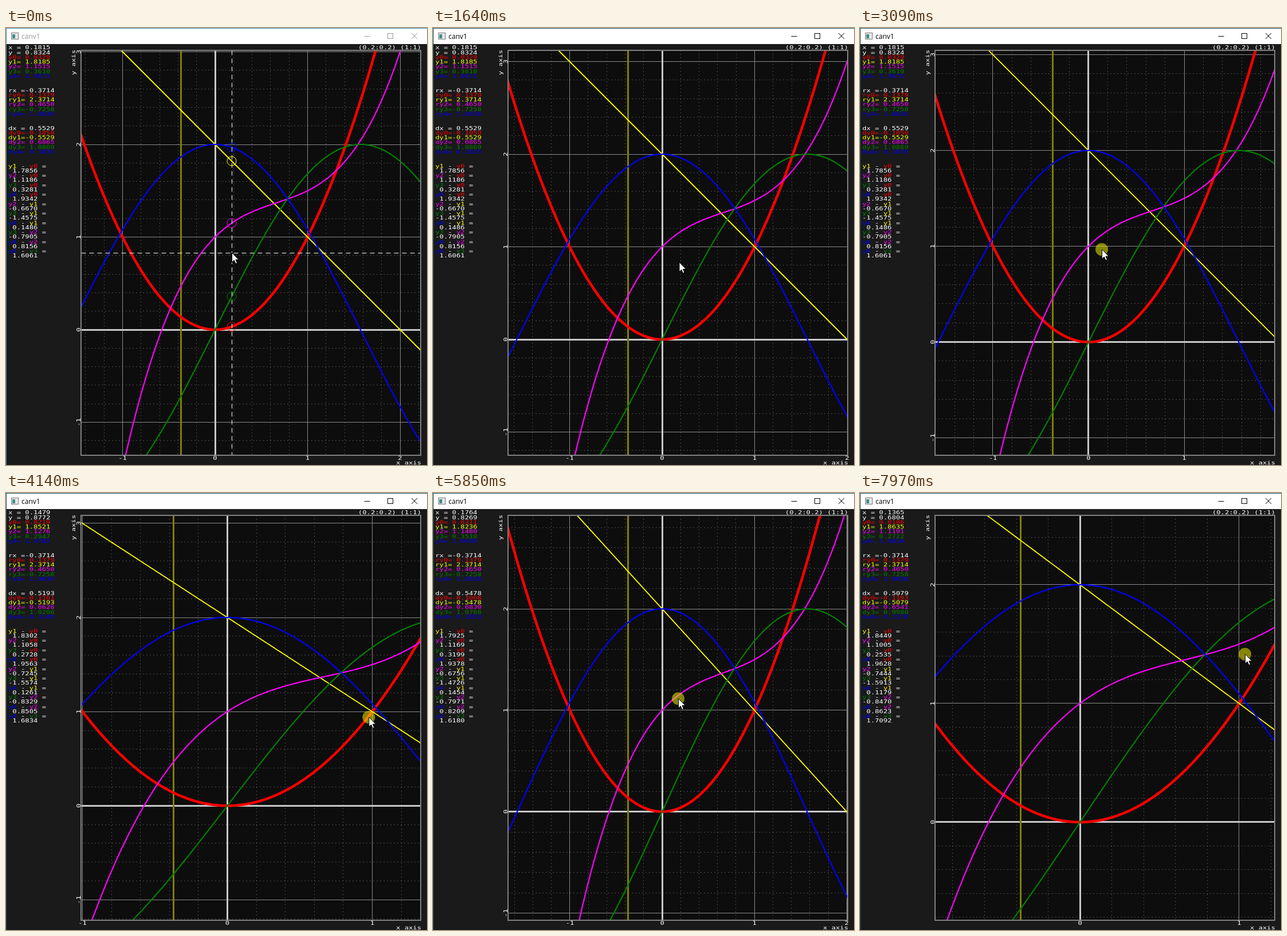
An HTML page with a canvas that plays this animation: 735 px wide and 762 px high, repeating every 8000 ms.

```html
<!DOCTYPE html>
<html lang="en">
<head>
<meta charset="utf-8">
<title>canv1</title>
<style>
  html, body { margin: 0; width: 100%; height: 100%; overflow: hidden; background: #1a1a1a; }
  canvas { display: block; }
</style>
</head>
<body>
<canvas id="stage" width="735" height="762"></canvas>
<script>
const ctx = document.getElementById('stage').getContext('2d');
const LOOP = 8000, LAG = 30;
const PLOT = { l: 131, t: 39, r: 724, b: 745 };
const WIDTH = PLOT.r - PLOT.l, HEIGHT = PLOT.b - PLOT.t;
const START = { ox: 365, oy: 526, sx: 161.5, sy: 161.5 };
const BASE = { ox: 400, oy: 543, sx: 161.5, sy: 161.5 };
const REF_X = -0.3714;
const CHAR = 7.34, ROW = 8.25;

const curves = [
  { f: x => x * x, color: '#ff0000', width: 4.5 },
  { f: x => 2 - x, color: '#ffff00', width: 1.8 },
  { f: x => 1 + x - x * x + x ** 3 / 2, color: '#ff00ff', width: 2.2 },
  { f: x => 2 * Math.sin(x), color: '#008000', width: 2.2 },
  { f: x => 2 * Math.cos(x), color: '#0000ff', width: 2.2 }
];

// start time, interaction, data point under the pointer (omitted while it moves freely)
const phases = [
  [0, 'hover', 0.1815, 0.8324],
  [360, 'pan', 0.1815, 0.8324],
  [1640, 'idle', 0.1815, 0.8324],
  [1920, 'even', 0.1815, 0.8324],
  [3330, 'hover'],
  [3560, 'free', 0.1479, 0.8772],
  [5060, 'hover'],
  [5240, 'free', 0.1764, 0.8269],
  [6210, 'hover'],
  [6310, 'hover', 0.1365, 0.6804],
  [6870, 'free', 0.1365, 0.6804]
];

// pointer path: time, x, y
const path = [
  [0, 394, 392], [360, 394, 392], [680, 455, 432], [960, 360, 445], [1290, 375, 355],
  [1610, 429.5, 408.5], [1920, 429.5, 408.5], [2280, 426, 530], [2660, 424, 290],
  [2760, 424, 290], [3060, 422, 385], [3090, 422, 386], [3250, 429, 408], [3330, 429, 408],
  [3530, 424, 401], [3580, 424, 401], [4070, 641, 391], [4110, 638.4, 390], [4140, 634, 391],
  [4610, 270, 396], [4990, 424, 401], [5060, 424, 401], [5210, 428.5, 409.5],
  [5260, 428.5, 409.5], [5340, 427, 402], [5490, 427, 402], [5690, 427, 300], [5820, 427, 348],
  [5850, 428, 358], [6030, 428, 460], [6170, 428.5, 409.5], [6210, 428.5, 409.5],
  [6310, 422, 433], [6870, 422, 433], [7120, 525.4, 416], [7150, 527, 421],
  [7660, 610, 335], [7710, 610, 335], [7940, 670, 278], [7970, 672, 281], [8000, 672, 281]
];

function slope(i, axis) {
  if (i === 0 || i === path.length - 1) return 0;
  const [p, q, r] = [path[i - 1], path[i], path[i + 1]];
  const before = q[axis] - p[axis], after = r[axis] - q[axis];
  return before * after <= 0 ? 0 : (before + after) / (r[0] - p[0]);
}

function pointer(t) {
  let i = 0;
  while (i < path.length - 2 && path[i + 1][0] <= t) i++;
  const a = path[i], b = path[i + 1], span = b[0] - a[0];
  const u = Math.max(0, (t - a[0]) / span), v = 1 - u;
  return [1, 2].map(k =>
    v * v * (1 + 2 * u) * a[k] + u * u * (3 - 2 * u) * b[k] +
    span * u * v * (v * slope(i, k) - u * slope(i + 1, k)));
}

function viewAt(t, [start, mode, dataX, dataY]) {
  if (t < 360) return START;
  const [mx, my] = pointer(Math.max(start, t - LAG));
  if (mode === 'pan') return { ...START, ox: START.ox + mx - 394.3, oy: START.oy + my - 391.6 };
  if (mode !== 'even' && mode !== 'free') return BASE;
  const ax = BASE.ox + dataX * BASE.sx, ay = BASE.oy - dataY * BASE.sy;
  const zoomY = 1 / (1 + (my - ay) / HEIGHT);
  const zoomX = mode === 'even' ? zoomY : 1 / (1 - (mx - ax) / WIDTH);
  const sx = BASE.sx * zoomX, sy = BASE.sy * zoomY;
  return { ox: ax - dataX * sx, oy: ay + dataY * sy, sx, sy };
}

function line(x1, y1, x2, y2, color, width = 1, dash = []) {
  const snap = v => width % 2 ? Math.floor(v) + 0.5 : Math.round(v);
  ctx.strokeStyle = color;
  ctx.lineWidth = width;
  ctx.setLineDash(dash);
  ctx.beginPath();
  ctx.moveTo(snap(x1), snap(y1));
  ctx.lineTo(snap(x2), snap(y2));
  ctx.stroke();
  ctx.setLineDash([]);
}
const vertical = (x, ...style) => line(x, PLOT.t, x, PLOT.b, ...style);
const horizontal = (y, ...style) => line(PLOT.l, y, PLOT.r, y, ...style);

function disc(x, y, r, color) {
  ctx.fillStyle = color;
  ctx.beginPath();
  ctx.arc(x, y, r, 0, Math.PI * 2);
  ctx.fill();
}

// wide terminal lettering, centred vertically on y
function label(text, x, y, color = '#fff', align = 'left', angle = 0) {
  ctx.save();
  ctx.translate(x, y);
  ctx.rotate(angle);
  ctx.scale(1.355, 1);
  ctx.font = '9px "DejaVu Sans Mono", monospace';
  ctx.textAlign = align;
  ctx.fillStyle = color;
  ctx.fillText(text, 0, 3.3);
  ctx.restore();
}

function drawWindow(active) {
  const ink = active ? '#000' : '#999';
  ctx.fillStyle = '#1a1a1a';
  ctx.fillRect(0, 0, 735, 762);
  ctx.fillStyle = '#fff';
  ctx.fillRect(0, 0, 735, 28);
  line(0, 0, 735, 0, active ? '#17505f' : '#2f8db0');
  line(0, 0, 0, 762, active ? '#17505f' : '#2f8db0');
  ctx.fillStyle = '#777';
  ctx.fillRect(9, 8, 13, 12);
  ctx.fillStyle = '#e8e8e8';
  ctx.fillRect(10, 9, 11, 10);
  ctx.fillStyle = '#3f8f8a';
  ctx.fillRect(11, 11, 5, 7);
  ctx.font = '12px "Open Sans", "Noto Sans", sans-serif';
  ctx.textAlign = 'left';
  ctx.fillStyle = ink;
  ctx.fillText('canv1', 27, 19);
  line(625, 14, 635, 14, ink);
  ctx.strokeStyle = ink;
  ctx.strokeRect(666.5, 9.5, 9, 9);
  ctx.beginPath();
  ctx.moveTo(708, 9); ctx.lineTo(718, 19);
  ctx.moveTo(718, 9); ctx.lineTo(708, 19);
  ctx.stroke();
}

function drawPanel(x, y) {
  const signed = v => (v < 0 ? '' : ' ') + v.toFixed(4);
  const write = (row, text, color, column = 0) =>
    label(text, 4 + column * CHAR, 34 + row * ROW, color);
  const now = curves.map(c => c.f(x)), ref = curves.map(c => c.f(REF_X));
  write(0, 'x =' + signed(x));
  write(1, 'y =' + signed(y));
  write(9, 'rx =' + signed(REF_X));
  write(17, 'dx =' + signed(x - REF_X));
  curves.forEach(({ color }, i) => {
    write(2 + i, `y${i}=` + signed(now[i]), color);
    write(10 + i, `ry${i}=` + signed(ref[i]), color);
    write(18 + i, `dy${i}=` + signed(now[i] - ref[i]), color);
  });
  let row = 25;
  for (let b = 0; b < 4; b++) {
    for (let a = b + 1; a < 5; a++) {
      write(row, 'y' + a, curves[a].color);
      write(row, '-', '#fff', 3);
      write(row, 'y' + b, curves[b].color, 5);
      write(row, '=', '#fff', 8);
      write(row + 1, signed(now[a] - now[b]));
      row += 2;
    }
  }
}

function drawGrid(view) {
  const { ox, oy, sx, sy } = view;
  const eachTick = (from, to, draw) => {
    for (let n = Math.ceil(from * 5); n <= to * 5; n++) draw(n / 5, n);
  };
  const style = n => n % 5 ? ['#858585', 1, [1, 5]] : ['#8a8a8a', 1];
  const turn = -Math.PI / 2;
  eachTick((PLOT.l - ox) / sx, (PLOT.r - ox) / sx, (v, n) => {
    const x = ox + v * sx;
    vertical(x, ...style(n));
    if (n % 5 === 0) label(String(n / 5), x, 749.5, '#fff', 'center');
  });
  eachTick((oy - PLOT.b) / sy, (oy - PLOT.t) / sy, (v, n) => {
    const y = oy - v * sy;
    horizontal(y, ...style(n));
    if (n % 5 === 0) label(String(n / 5), 127, y, '#fff', 'center', turn);
  });
  label('(0.2:0.2) (1:1)', 725, 34, '#fff', 'right');
  label('x axis', 725, 757.5, '#fff', 'right');
  label('y axis', 118, 38, '#fff', 'right', turn);
}

function drawCurves({ ox, oy, sx, sy }) {
  vertical(ox, '#c8c8c8', 3);
  horizontal(oy, '#c8c8c8', 3);
  vertical(ox + REF_X * sx, '#808000', 3);
  for (const { f, color, width } of curves) {
    ctx.strokeStyle = color;
    ctx.lineWidth = width;
    ctx.beginPath();
    for (let x = PLOT.l - 2; x <= PLOT.r + 2; x += 2) ctx.lineTo(x, oy - f((x - ox) / sx) * sy);
    ctx.stroke();
  }
}

function drawCrosshair(mx, my, view) {
  vertical(mx, '#fff', 1, [8, 6]);
  horizontal(my, '#fff', 1, [8, 6]);
  ctx.lineWidth = 1;
  for (const { f, color } of curves) {
    ctx.strokeStyle = color;
    ctx.beginPath();
    ctx.arc(mx, view.oy - f((mx - view.ox) / view.sx) * view.sy, 8, 0, Math.PI * 2);
    ctx.stroke();
  }
}

const arrow = new Path2D('M0 0V16.5L3.8 13L6.4 19L9 17.9L6.5 12H11.8Z');
function drawPointer(x, y, pressed) {
  if (pressed) disc(x, y, 11, 'rgba(255,255,0,.5)');
  ctx.save();
  ctx.translate(x + 0.5, y);
  ctx.strokeStyle = '#000';
  ctx.lineWidth = 1;
  ctx.fillStyle = '#fff';
  ctx.fill(arrow);
  ctx.stroke(arrow);
  ctx.restore();
}

function draw(t) {
  const phase = phases.findLast(p => p[0] <= t);
  const mode = phase[1];
  const [mx, my] = pointer(t);
  const view = viewAt(t, phase);
  const dataX = phase[2] ?? (mx - view.ox) / view.sx;
  const dataY = phase[3] ?? (view.oy - my) / view.sy;

  drawWindow(t >= 360);
  drawPanel(dataX, dataY);
  ctx.fillStyle = '#0d0d0d';
  ctx.fillRect(PLOT.l, PLOT.t, WIDTH, HEIGHT);
  drawGrid(view);
  ctx.save();
  ctx.beginPath();
  ctx.rect(PLOT.l, PLOT.t, WIDTH, HEIGHT);
  ctx.clip();
  drawCurves(view);
  if (mode === 'hover') drawCrosshair(mx, my, view);
  ctx.restore();
  ctx.strokeStyle = '#808080';
  ctx.lineWidth = 2;
  ctx.strokeRect(PLOT.l, PLOT.t, WIDTH, HEIGHT);
  drawPointer(mx, my, ['pan', 'even', 'free'].includes(mode) || t >= 6690);
}

const begin = performance.now();
function tick() {
  draw((performance.now() - begin) % LOOP);
  requestAnimationFrame(tick);
}
tick();
</script>
</body>
</html>
```
